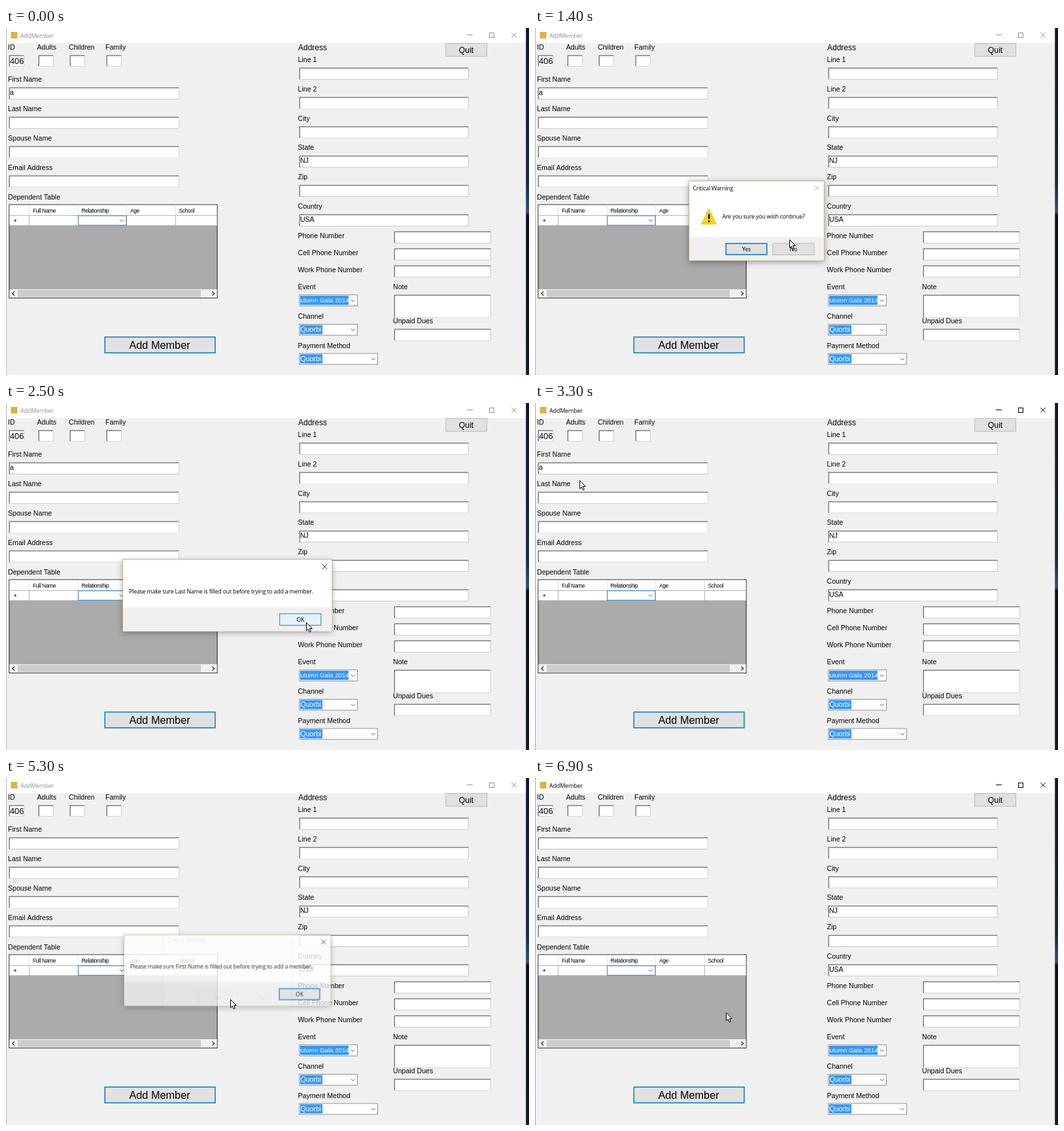
Write an HTML page with a canvas that moves like this. It is 800 by 530 pixels and loops after 7.1 s.

```html
<!DOCTYPE html>
<html>
<head>
<meta charset="utf-8">
<title>AddMember</title>
<style>
html, body { margin: 0; width: 100%; height: 100%; overflow: hidden; background: #f0f0f0; }
canvas { display: block; }
</style>
</head>
<body>
<canvas id="stage" width="800" height="530"></canvas>
<script>
let ctx = document.getElementById('stage').getContext('2d');
const layer = document.createElement('canvas');
layer.width = 800;
layer.height = 530;
const layerCtx = layer.getContext('2d');

const LOOP = 7100, STEP = 100;
const SANS = '"Liberation Sans", Arial, sans-serif';
const UI = '"Open Sans", "Noto Sans", sans-serif';
const BLUE = '#0078d7';

function rect(x, y, w, h, color) {
  ctx.fillStyle = color;
  ctx.fillRect(x, y, w, h);
}

function frame(x, y, w, h, line, fill, size = 1) {
  rect(x, y, w, h, line);
  rect(x + size, y + size, w - 2 * size, h - 2 * size, fill);
}

function text(s, x, y, size = 10.6, { color = '#000', font = SANS, gap = 0, align = 'left' } = {}) {
  ctx.font = `${size}px ${font}`;
  ctx.letterSpacing = gap + 'px';
  ctx.textAlign = align;
  ctx.fillStyle = color;
  ctx.fillText(s, x, y);
}

const uiText = (s, x, y, opts) => text(s, x, y, 8.8, { font: UI, gap: -0.19, ...opts });

function stroke(points, color, width = 1) {
  ctx.strokeStyle = color;
  ctx.lineWidth = width;
  ctx.beginPath();
  points.forEach(p => ctx.lineTo(...p));
  ctx.stroke();
}

function cross(x, y, r, color) {
  stroke([[x - r, y - r], [x + r, y + r]], color);
  stroke([[x + r, y - r], [x - r, y + r]], color);
}

const chevron = (x, y) => stroke([[x - 3, y - 1.5], [x, y + 1.5], [x + 3, y - 1.5]], '#555');

// Sunken box: dark top and left edges, light bottom and right ones.
function field(x, y, w, h, value = '', size) {
  rect(x, y, w, h, '#e3e3e3');
  rect(x, y, w - 0.7, h - 0.7, '#a0a0a0');
  rect(x + 0.7, y + 0.7, w - 1.4, h - 1.4, '#696969');
  rect(x + 1.5, y + 1.5, w - 2.2, h - 2.2, '#fff');
  text(value, x + 1.5, y + (size ? 14 : 11.6), size);
}

function combo(x, y, w, value, selected, size) {
  frame(x, y, w, 17.5, '#7a7a7a', '#fff', 0.8);
  rect(x + 1.6, y + 1.6, selected, 14, '#3297fd');
  text(value, x + 2, y + 12.1, size, { color: '#fff' });
  chevron(x + w - 7, y + 9);
}

function inside(p, x, y, w, h) {
  return p && p[0] >= x && p[0] < x + w && p[1] >= y && p[1] < y + h;
}

function drawTitle(active) {
  const ink = active ? '#000' : '#8f8f8f';
  rect(0, 0, 796, 23, '#fff');
  rect(7.5, 6, 10, 10, '#dfb23c');
  text('AddMember', 22, 14.5, 9, { font: UI, gap: -0.19, color: ink });
  rect(705, 10, 9, 1, ink);
  frame(739, 7, 8, 8, ink, '#fff');
  cross(777, 10.8, 3.7, ink);
}

function drawEdges(active) {
  rect(0, 0, 1, 530, active ? '#c99f62' : '#b4b4b4');
  const g = ctx.createLinearGradient(0, 0, 0, 530);
  g.addColorStop(0, '#0c1630');
  g.addColorStop(0.45, '#17284e');
  g.addColorStop(0.53, '#33507f');
  g.addColorStop(0.54, '#0a1020');
  g.addColorStop(1, '#10182c');
  rect(795.3, 0, 4.7, 530, g);
}

function drawTable() {
  frame(4.4, 269.4, 319.2, 143.4, '#1a1a1a', '#ababab');
  rect(5.4, 270.4, 317.2, 31.6, '#fff');
  rect(5.4, 286, 317.2, 0.8, '#a0a0a0');
  rect(5.4, 301.4, 317.2, 0.8, '#a0a0a0');
  [35, 110, 184, 259].forEach(x => {
    rect(x, 271, 0.8, 15, '#dcdcdc');
    rect(x, 286, 0.8, 16, '#a0a0a0');
  });
  const heads = { 'Full Name': 41, Relationship: 115.5, Age: 190, School: 264.5 };
  for (const s in heads) text(s, heads[s], 282, 8.4, { gap: -0.35 });
  text('*', 12, 299.5, 11);
  frame(110, 286.3, 74.5, 15.4, '#2f7fc8', '#fff');
  chevron(177, 294);
  rect(5.4, 399, 317.2, 12.8, '#f0f0f0');
  rect(18, 400, 280, 11, '#cdcdcd');
  stroke([[13, 402.5], [9.8, 405.5], [13, 408.5]], '#333', 1.3);
  stroke([[315.5, 402.5], [318.7, 405.5], [315.5, 408.5]], '#333', 1.3);
}

function drawForm(firstName, hover) {
  rect(0, 23, 796, 507, '#f0f0f0');
  [['ID', 3, 4], ['Adults', 47.5, 49], ['Children', 96, 97], ['Family', 152, 153]].forEach(([s, x, box], i) => {
    text(s, x, 33);
    field(box + 0.4, 41.3, 23.5, 17.5, i ? '' : '406', 12.8);
  });
  ['First Name', 'Last Name', 'Spouse Name', 'Email Address'].forEach((s, i) => {
    const y = 90.6 + i * 44.8;
    text(s, 3, y - 8.4);
    field(4.4, y, 260.4, 18.5, i ? '' : firstName);
  });
  text('Dependent Table', 3, 261.5);
  drawTable();

  text('Address', 447, 34.3, 12);
  const preset = { State: 'NJ', Country: 'USA' };
  ['Line 1', 'Line 2', 'City', 'State', 'Zip', 'Country'].forEach((s, i) => {
    const y = 60.4 + i * 44.8;
    text(s, 446.5, y - 8.4);
    field(448.4, y, 259.6, 18.5, preset[s]);
  });
  ['Phone Number', 'Cell Phone Number', 'Work Phone Number'].forEach((s, i) => {
    text(s, 446.5, 320.5 + i * 26);
    field(593.5, 310.4 + i * 26, 148.4, 18.5);
  });
  text('Event', 446.5, 399);
  combo(448.4, 407.3, 89.4, 'utumn Gala 2014', 74, 9.7);
  text('Channel', 446.5, 443.5);
  combo(448.4, 452.1, 89.4, 'Quorbi', 34);
  text('Payment Method', 446.5, 488.5);
  combo(448.4, 496.7, 120.4, 'Quorbi', 34);
  text('Note', 592, 399);
  field(593.5, 407.3, 148.4, 35.5);
  text('Unpaid Dues', 592, 451);
  field(593.5, 459.3, 148.4, 18.5);

  frame(672.4, 23.3, 63.6, 20.3, '#adadad', '#e1e1e1', 0.8);
  text('Quit', 704, 38, 12.3, { align: 'center' });
  frame(150.5, 471.3, 170.2, 25.6, BLUE, hover ? '#cce4f7' : '#e1e1e1', hover ? 0.8 : 1.5);
  text('Add Member', 235, 490, 16.3, { align: 'center' });
}

function button(label, x, y, main, pointer) {
  const over = inside(pointer, x, y, 64, 18.5);
  frame(x, y, 64, 18.5, main ? BLUE : '#adadad', over ? '#e5f1fb' : '#e1e1e1', over ? 0.9 : main ? 1.5 : 0.8);
  uiText(label, x + 32, y + 12.5, { align: 'center' });
}

// Panel that grows a little while fading in and shrinks while fading out.
function popup(t, open, close, [x, y, w, h], foot, body) {
  const alpha = Math.min(1, (t - open) / 250, 1 - (t - close) / 215);
  if (alpha <= 0) return;
  const page = ctx;
  ctx = layerCtx;
  ctx.clearRect(0, 0, 800, 530);
  ctx.shadowColor = 'rgba(0,0,0,0.35)';
  ctx.shadowBlur = 9;
  ctx.shadowOffsetY = 2;
  rect(x, y, w, h, '#c9ab70');
  ctx.shadowColor = 'transparent';
  rect(x + 0.8, y + 0.8, w - 1.6, h - 1.6, '#fff');
  rect(x + 0.8, foot, w - 1.6, y + h - 0.8 - foot, '#f0f0f0');
  body();
  ctx = page;

  const cx = x + w / 2, cy = y + h / 2, scale = 0.94 + 0.06 * alpha;
  ctx.save();
  ctx.globalAlpha = alpha;
  ctx.translate(cx, cy);
  ctx.scale(scale, scale);
  ctx.drawImage(layer, -cx, -cy);
  ctx.restore();
}

function warning(t, open, close, pointer) {
  popup(t, open, close, [235.2, 233.4, 207.4, 122.2], 319, () => {
    uiText('Critical Warning', 241.5, 248);
    cross(431, 244, 3.7, '#bdbdbd');
    ctx.fillStyle = '#f9d423';
    stroke([[266, 276], [277.5, 299.5], [254.5, 299.5], [266, 276]], '#dfb000');
    ctx.fill();
    rect(265, 284, 2.4, 8, '#111');
    rect(265, 294, 2.4, 2.6, '#111');
    uiText('Are you sure you wish continue?', 286.5, 290.5);
    button('Yes', 291.4, 328.4, true, pointer);
    button('No', 363.4, 328.4, false, pointer);
  });
}

function notice(t, open, close, name, pointer) {
  popup(t, open, close, [178.2, 238.6, 321, 110.6], 312, () => {
    cross(487.5, 250, 3.8, '#222');
    uiText(`Please make sure ${name} is filled out before trying to add a member.`, 188, 290.5);
    button('OK', 418.3, 321.4, true, pointer);
  });
}

// Pointer stops: time, x, y.
const path = [
  [300, 285, 484], [800, 330, 400], [1400, 389, 323], [1800, 332, 337], [2100, 345, 338],
  [2500, 459, 335], [2900, 459, 335], [3300, 68, 118], [3500, 22, 101], [3800, 22, 101],
  [4400, 284, 491], [4600, 284, 491], [5000, 325, 337], [5200, 330, 337], [5300, 343, 338],
  [5700, 455, 332], [6000, 455, 332], [6600, 318, 352], [6700, 318, 352], [6900, 292, 358], [7100, 292, 358]
];

function pointerAt(t) {
  const i = path.findIndex(p => p[0] > t);
  if (i < 1) return null;
  const [t0, x0, y0] = path[i - 1], [t1, x1, y1] = path[i];
  const u = (t - t0) / (t1 - t0), e = u * u * (3 - 2 * u);
  return [Math.round(x0 + (x1 - x0) * e), Math.round(y0 + (y1 - y0) * e)];
}

function drawPointer([x, y]) {
  ctx.save();
  ctx.translate(x + 0.5, y + 0.5);
  ctx.beginPath();
  [[0, 0], [0, 12.5], [2.8, 9.8], [4.8, 14.4], [6.8, 13.5], [4.9, 9.1], [8.8, 9]].forEach(p => ctx.lineTo(...p));
  ctx.closePath();
  ctx.fillStyle = '#fff';
  ctx.strokeStyle = '#000';
  ctx.lineWidth = 1;
  ctx.fill();
  ctx.stroke();
  ctx.restore();
}

function draw(t) {
  const pointer = pointerAt(t);
  const active = (t >= 2900 && t < 4500) || t >= 6000;
  drawForm(t < 3700 ? 'a' : '', active && inside(pointer, 150, 471, 171, 26));
  drawTitle(active);
  drawEdges(active);
  notice(t, 1900, 2700, 'Last Name', pointer);
  notice(t, 5100, 5900, 'First Name', pointer);
  warning(t, 0, 1900, pointer);
  warning(t, 4400, 5100, pointer);
  if (pointer) drawPointer(pointer);
}

const start = performance.now();
let shown = -1;
function tick() {
  const t = Math.floor(((performance.now() - start) % LOOP) / STEP) * STEP;
  if (t !== shown) draw(shown = t);
  requestAnimationFrame(tick);
}
draw(shown = 0);
requestAnimationFrame(tick);
</script>
</body>
</html>
```
